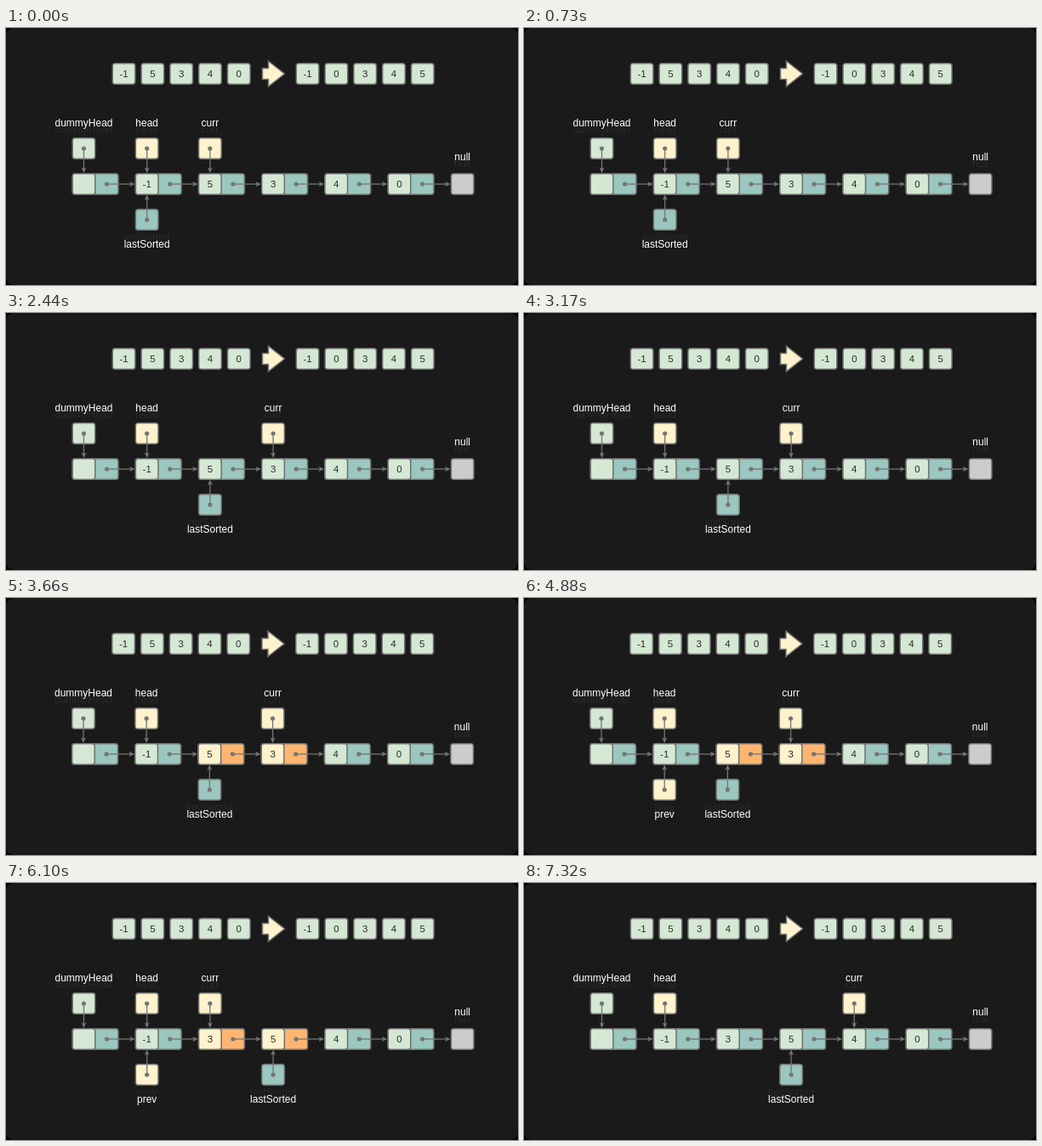
An HTML page for the animation above (8 s loop, 602 px wide and 303 px high).

```html
<!DOCTYPE html>
<html lang="en">
<head>
<meta charset="utf-8">
<title>Linked list insertion sort</title>
<style>
  html, body { margin: 0; width: 100%; height: 100%; overflow: hidden; background: #000; }
  svg { display: block; width: 602px; height: 303px; }
  text { font: 12px "Liberation Sans", Arial, sans-serif; text-anchor: middle; }
  .num { font-size: 11.5px; fill: #2b2b2b; }
  .label { fill: #fff; }
  .ghost { fill: #2a2a2a; }
  .box { stroke: #707070; stroke-width: 1.5; }
  .line { stroke: #757575; stroke-width: 1.3; }
  .tip { fill: #757575; }
</style>
</head>
<body>
<svg viewBox="0 0 602 303">
  <rect width="602" height="303" rx="9" fill="#1a1a1a"/>
  <g id="scene"></g>
</svg>
<script>
const GREEN = '#d5e8d4', TEAL = '#9ac7bf', YELLOW = '#fff2cc', ORANGE = '#ffb570', GREY = '#cccccc';
const LOOP = 8000, STEP = 1220;
const CELL = 26.6, ROW = 184, TOP = 142, BOTTOM = 226;

// curr, last, prev are node positions; hot lists highlighted nodes
const steps = [
  { list: [-1, 5, 3, 4, 0], curr: 2, last: 1, hot: [], dx: 0 },
  { list: [-1, 5, 3, 4, 0], curr: 2, last: 2, hot: [1, 2], dx: -0.5 },
  { list: [-1, 5, 3, 4, 0], curr: 3, last: 2, hot: [], dx: 0 },
  { list: [-1, 5, 3, 4, 0], curr: 3, last: 2, hot: [2, 3], dx: -0.5 },
  { list: [-1, 5, 3, 4, 0], curr: 3, last: 2, prev: 1, hot: [2, 3], dx: -0.5 },
  { list: [-1, 3, 5, 4, 0], curr: 2, last: 3, prev: 1, hot: [2, 3], dx: 0 },
  { list: [-1, 3, 5, 4, 0], curr: 4, last: 3, hot: [], dx: 0 }
];

const nodeX = i => 78.2 + 74.2 * i;
const midX = i => nodeX(i) + CELL / 2;

const box = (x, cy, fill, w = CELL) =>
  `<rect class="box" x="${x}" y="${cy - 12.2}" width="${w}" height="24.4" rx="3" fill="${fill}"/>`;

const text = (x, y, s, cls) => `<text class="${cls}" x="${x}" y="${y}">${s}</text>`;

const label = (x, y, s, ghostDy) =>
  text(x, y + ghostDy, s, 'ghost') + text(x, y, s, 'label');

// Dot at (x, y) and an arrow of the given length, turned by angle
const arrow = (x, y, length, angle) =>
  `<g transform="translate(${x} ${y}) rotate(${angle})">
    <path class="line" d="M0 0H${length - 5}"/>
    <path class="tip" d="M${length} 0l-6.5 -2.9l1.5 2.9l-1.5 2.9z"/>
    <circle class="tip" r="2.6"/>
  </g>`;

const array = (x, values) => values.map((v, i) => {
  const left = x + 33.8 * i;
  return box(left, 54, GREEN) + text(left + CELL / 2, 58, v, 'num');
}).join('');

function node(i, value, hot) {
  const x = nodeX(i);
  return box(x, ROW, hot ? ORANGE : TEAL, 53.8) +
    box(x, ROW, hot ? YELLOW : GREEN) +
    text(midX(i), 188, value, 'num') +
    arrow(x + 40.4, ROW, 33, 0);
}

function pointer(i, name, fill, below) {
  const x = midX(i);
  return box(nodeX(i), below ? BOTTOM : TOP, fill) +
    (below ? label(x, 259, name, -8) + arrow(x, BOTTOM, 29.5, -90)
           : label(x, 116, name, 8) + arrow(x, TOP, 29, 90));
}

function draw(s) {
  return `<g transform="translate(${s.dx} 0)">` +
    array(125.3, [-1, 5, 3, 4, 0]) +
    '<path class="box" fill="#fff2cc" d="M301.5 47.5H308.5V39L327.5 54L308.5 69V60.5H301.5z"/>' +
    array(341.3, [-1, 0, 3, 4, 5]) +
    box(nodeX(6), ROW, GREY) + label(midX(6), 156, 'null', 8) +
    ['', ...s.list].map((v, i) => node(i, v, s.hot.includes(i))).join('') +
    pointer(0, 'dummyHead', GREEN) +
    pointer(1, 'head', YELLOW) +
    pointer(s.curr, 'curr', YELLOW) +
    pointer(s.last, 'lastSorted', TEAL, true) +
    (s.prev ? pointer(s.prev, 'prev', YELLOW, true) : '') +
    '</g>';
}

const scene = document.getElementById('scene');
const start = performance.now();
let shown = -1;

function tick(now) {
  const t = Math.max(0, now - start) % LOOP;
  const i = Math.floor(t / STEP);
  if (i !== shown) scene.innerHTML = draw(steps[shown = i]);
  requestAnimationFrame(tick);
}
tick(start);
</script>
</body>
</html>
```
